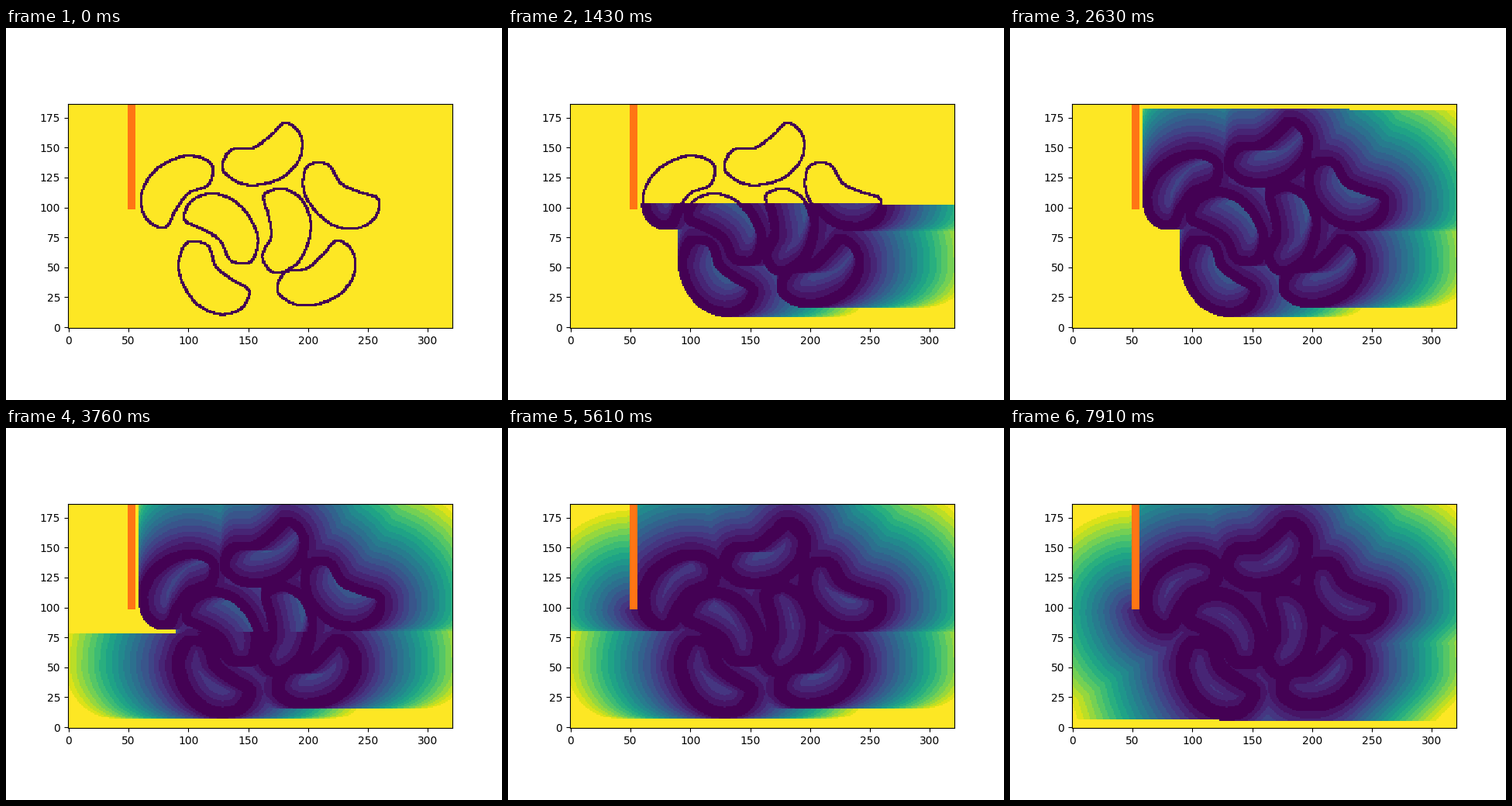
A matplotlib script that plays this animation: 640x480 px, repeating every 8 s.

```python
import math

import matplotlib
import matplotlib.pyplot as plt
import numpy as np
from matplotlib.animation import FuncAnimation

COLS, ROWS = 321, 187
CELLS = COLS * ROWS
CELL_PX = 496 / COLS
LEFT_PX, BOTTOM_PX = 80, 386.95
FAR = 1e6
LOOP_MS, FRAME_MS = 8000, 20
STEP_MS, CELLS_PER_STEP = 100, 2111

# Key points of the one bean outline, relative to its centre
BEAN = [(-51.5, 18), (-41, -4), (-11, -7.5), (11, -23), (31.5, -40),
        (49, -25), (50, 2), (33, 26), (3, 39), (-30, 37.5)]
# Centre x, centre y and clockwise turn in degrees of each bean
POSES = [(222.3, 209.7, 162), (330.5, 162, 0), (431, 213.5, 61),
         (279, 261, 248), (353.8, 262, -62), (267, 320.7, 74),
         (400, 316.6, -5)]
# Time of the first step and cells visited by then, for each sweep
SWEEP_STARTS = [(-70, 1657), (2760, 4475), (5510, 7314)]


def closed_curve(points, samples=120):
    """Smooth closed cubic through the points."""
    p = np.array(points, float)
    step = np.roll(p, -1, axis=0) - p
    h = np.hypot(*step.T)[:, None]
    slope = step / h
    h_prev, slope_prev = np.roll(h, 1, axis=0), np.roll(slope, 1, axis=0)
    tangent = (slope_prev * h + slope * h_prev) / (h + h_prev)
    t = np.linspace(0, 1, samples, endpoint=False)[:, None]
    parts = []
    for i in range(len(p)):
        j = (i + 1) % len(p)
        parts.append((2 * t**3 - 3 * t**2 + 1) * p[i]
                     + (t**3 - 2 * t**2 + t) * h[i] * tangent[i]
                     + (3 * t**2 - 2 * t**3) * p[j]
                     + (t**3 - t**2) * h[i] * tangent[j])
    return np.vstack(parts)


def build_seeds():
    """Cells under the bean outlines, drawn with a square pen one cell wide."""
    seeds = np.zeros((ROWS, COLS), bool)
    x, y = closed_curve(BEAN).T
    for cx, cy, turn in POSES:
        cos, sin = math.cos(math.radians(turn)), math.sin(math.radians(turn))
        col = (cx + x * cos - y * sin - LEFT_PX) / CELL_PX
        row = (BOTTOM_PX - cy - x * sin - y * cos) / CELL_PX
        for dc in (-0.5, 0.5):
            for dr in (-0.5, 0.5):
                seeds[(row + dr).astype(int), (col + dc).astype(int)] = True
    return seeds


def build_schedule():
    """Pairs of (time in ms, cells visited so far over all sweeps)."""
    marks = []
    for sweep, (time, visited) in enumerate(SWEEP_STARTS):
        done = False
        while not done and time < LOOP_MS:
            done = visited >= CELLS
            marks.append((time, sweep * CELLS + min(visited, CELLS)))
            time += STEP_MS
            visited += CELLS_PER_STEP
    return marks


def visit_order():
    up, right = range(1, ROWS + 1), range(1, COLS + 1)
    down, left = up[::-1], right[::-1]
    for rows, cols in ((up, right), (up, left), (down, left)):
        for r in rows:
            for c in cols:
                yield r, c


def run_sweeps(seeds, wall, totals):
    """Fast sweeping for the distance field, with a snapshot at each total."""
    dist = np.pad(np.where(seeds, 0.0, FAR), 1, constant_values=FAR).tolist()
    frozen = np.pad(seeds | wall, 1).tolist()
    order = visit_order()
    done, shots = 0, []
    for total in totals:
        for _ in range(total - done):
            r, c = next(order)
            if frozen[r][c]:
                continue
            line = dist[r]
            a = min(line[c - 1], line[c + 1])
            b = min(dist[r - 1][c], dist[r + 1][c])
            gap = a - b
            if -1 < gap < 1:
                new = (a + b + (2 - gap * gap) ** 0.5) / 2
            else:
                new = min(a, b) + 1
            if new < line[c]:
                line[c] = new
        done = total
        field = np.array(dist)[1:-1, 1:-1]
        shots.append(np.ma.array(field, mask=wall))
    return shots


wall = np.zeros((ROWS, COLS), bool)
wall[99:, 50:56] = True
times, totals = zip(*build_schedule())
shots = run_sweeps(build_seeds(), wall, totals)

cmap = matplotlib.colormaps["viridis"].resampled(20)
cmap.set_bad("#ff7514")

fig, ax = plt.subplots(figsize=(6.4, 4.8), dpi=100)
image = ax.imshow(shots[0], cmap=cmap, vmin=0, vmax=100,
                  origin="lower", interpolation="nearest")


def draw(i):
    now = i * FRAME_MS + FRAME_MS - 1
    image.set_data(shots[np.searchsorted(times, now, side="right") - 1])
    return [image]


anim = FuncAnimation(fig, draw, frames=LOOP_MS // FRAME_MS, interval=FRAME_MS,
                     repeat=True, repeat_delay=0)
plt.show()
```
